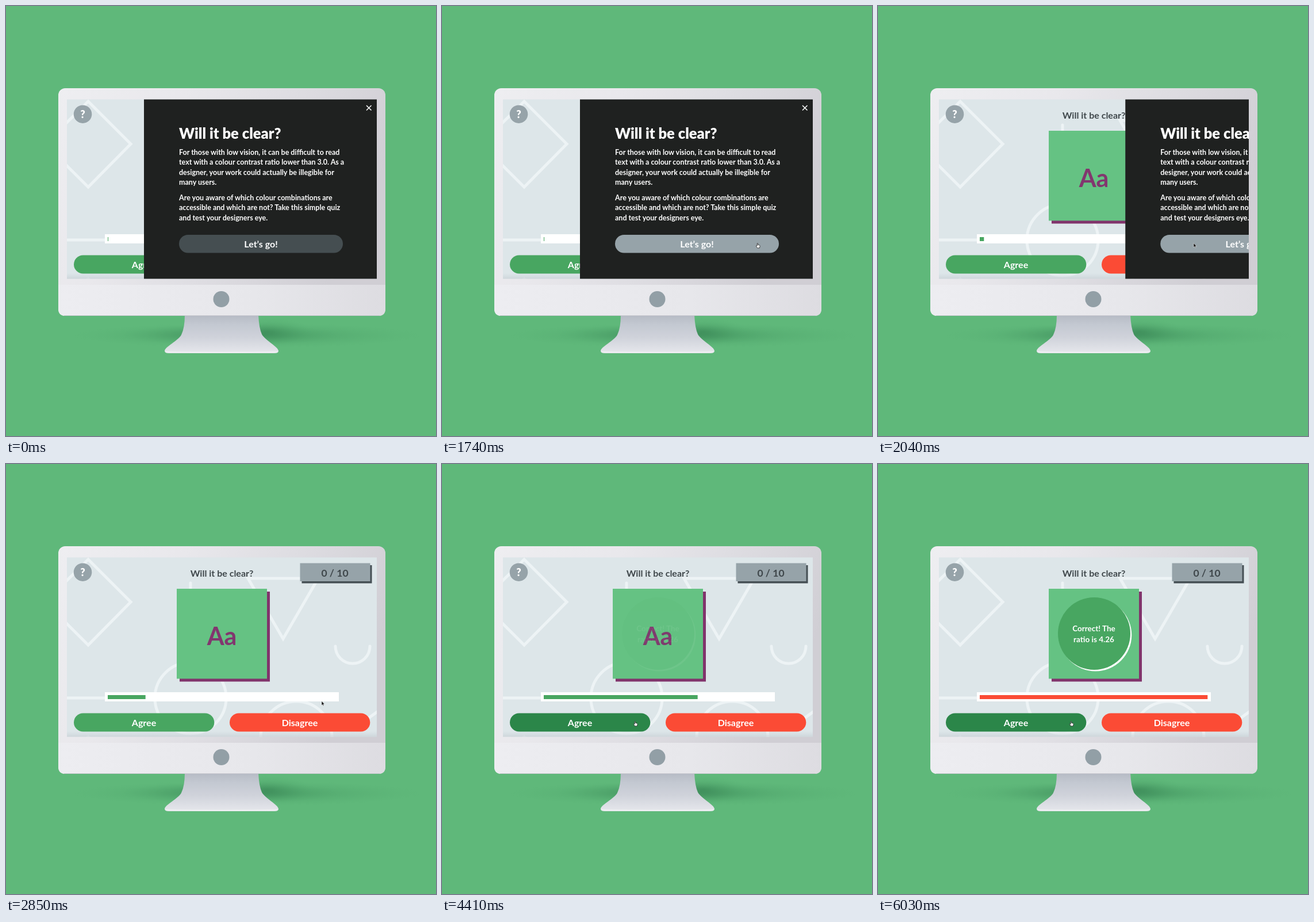
Animation, 748 px wide and 748 px high, one loop 6060 ms. Source, as an HTML page:

```html
<!DOCTYPE html>
<html lang="en">
<head>
<meta charset="utf-8">
<title>Contrast quiz</title>
<style>
  html, body { margin: 0; width: 100%; height: 100%; overflow: hidden; background: #5fb87a; }
  svg { display: block; width: 100%; height: 100%; }
  text { font-family: Lato, "Open Sans", sans-serif; font-weight: 700; }
  .mid { text-anchor: middle; }
  .label { font-size: 16px; fill: #fff; text-anchor: middle; }
  .body { font-size: 12.5px; fill: #fff; }
  .pattern { fill: none; stroke: #edf3f5; stroke-width: 5; stroke-linecap: round; }
</style>
</head>
<body>
<svg viewBox="0 0 748 748" xmlns="http://www.w3.org/2000/svg">
  <defs>
    <linearGradient id="shell" x1="0" x2="1" y1="0" y2="0.35">
      <stop offset="0" stop-color="#eeeef1"/>
      <stop offset="0.35" stop-color="#e9e8ec"/>
      <stop offset="0.65" stop-color="#dedde2"/>
      <stop offset="1" stop-color="#d0ced4"/>
    </linearGradient>
    <linearGradient id="chin" x1="0" x2="1" y1="0" y2="0">
      <stop offset="0" stop-color="#ededf1"/>
      <stop offset="0.6" stop-color="#e7e7eb"/>
      <stop offset="1" stop-color="#dddce1"/>
    </linearGradient>
    <linearGradient id="stand" x1="0" x2="0" y1="0" y2="1">
      <stop offset="0" stop-color="#b5bac4"/>
      <stop offset="0.25" stop-color="#c3c8d1"/>
      <stop offset="0.6" stop-color="#d0d3db"/>
      <stop offset="1" stop-color="#e6e7ec"/>
    </linearGradient>
    <linearGradient id="edge" x1="0" x2="0" y1="0" y2="1">
      <stop offset="0" stop-color="#ccd4d9" stop-opacity="0"/>
      <stop offset="1" stop-color="#c9d1d6" stop-opacity="0.8"/>
    </linearGradient>
    <radialGradient id="shade">
      <stop offset="0" stop-color="#2f7a4c" stop-opacity="0.75"/>
      <stop offset="0.5" stop-color="#3d8d5a" stop-opacity="0.4"/>
      <stop offset="1" stop-color="#4da56a" stop-opacity="0"/>
    </radialGradient>
    <clipPath id="screen"><rect x="106" y="162.500" width="539" height="312"/></clipPath>
  </defs>

  <rect width="748" height="748" fill="#5fb87a"/>
  <ellipse cx="420" cy="573" rx="306" ry="22" fill="url(#shade)" opacity="0.55"/>
  <ellipse cx="390" cy="572" rx="190" ry="19" fill="url(#shade)" opacity="0.7"/>
  <ellipse cx="455" cy="566" rx="75" ry="24" fill="url(#shade)" opacity="0.5"/>

  <path fill="url(#stand)" d="M311 537H439Q440 560 445 571C450 581 474 593 474 600Q474 604 467 604H283Q276 604 276 600C276 593 300 582 305 572Q311 560 311 537Z"/>
  <path fill="none" stroke="#f1f1f4" stroke-width="1.500" d="M278 601.500Q375 603.500 472 601.500"/>
  <rect x="91" y="143" width="569" height="396" rx="12" fill="url(#shell)"/>
  <path fill="url(#chin)" d="M91 485H660V527Q660 539 648 539H103Q91 539 91 527Z"/>
  <path fill="none" stroke="#c9c9d0" d="M101 538.500H650"/>
  <circle cx="374.500" cy="510" r="14" fill="#929fa6"/>

  <g clip-path="url(#screen)">
    <rect x="106" y="162" width="539" height="313" fill="#dde6e9"/>
    <g class="pattern">
      <path d="M143 166L217 240L143 315L68 240Z"/>
      <path d="M100 407H259M321 207V240"/>
      <circle cx="321" cy="407" r="62"/>
      <path d="M421 199H543L482 304Z"/>
      <path d="M573 317A30 30 0 0 0 633 317"/>
      <circle cx="505" cy="475" r="62"/>
      <path d="M650 428L625 446M130 487L143 475L156 487"/>
    </g>
    <rect x="106" y="465" width="539" height="10" fill="url(#edge)"/>

    <circle cx="133.500" cy="188.200" r="15.800" fill="#96a3a9"/>
    <text class="mid" x="133.500" y="195" font-size="18" style="font-weight:900" fill="#fff">?</text>
    <text class="mid" x="375.500" y="195.500" font-size="16" fill="#3f474b">Will it be clear?</text>
    <rect x="514.500" y="176" width="122" height="31.500" fill="#454f54"/>
    <rect x="511.500" y="172.500" width="122" height="31.500" fill="#96a3a9"/>
    <text class="mid" x="572" y="196" font-size="17.500" fill="#3f474b">0 / 10</text>

    <rect x="302" y="222" width="157" height="156.500" fill="#81346c"/>
    <rect x="297" y="217" width="157" height="156.500" fill="#65c283"/>
    <text class="mid" x="375.500" y="314.500" font-size="43" fill="#82366f">Aa</text>
    <g id="result">
      <circle cx="378.300" cy="297.500" r="63" fill="#fff"/>
      <circle cx="376" cy="295" r="63" fill="#48a661"/>
      <text class="mid" font-size="13.500" fill="#fff"><tspan x="375.500" y="291">Correct! The</tspan><tspan x="375.500" y="310">ratio is 4.26</tspan></text>
    </g>

    <rect x="172" y="397" width="407" height="16" fill="#fff"/>
    <rect id="bar" x="177" y="402" height="7"/>

    <rect id="agree" x="118" y="433.500" width="244.300" height="32" rx="16"/>
    <text class="label" x="240" y="456">Agree</text>
    <rect x="389" y="433.500" width="244.300" height="32" rx="16" fill="#fb4b35"/>
    <text class="label" x="511" y="456">Disagree</text>

    <g id="panel">
      <rect x="240" y="162" width="406" height="313" fill="#1f2120"/>
      <path d="M627 173L635.500 181.500M635.500 173L627 181.500" stroke="#fff" stroke-width="1.500"/>
      <text x="301" y="231" font-size="25.500" style="font-weight:900" fill="#fff">Will it be clear?</text>
      <g id="copy"></g>
      <rect id="start" x="301" y="398" width="285" height="31.500" rx="15.700"/>
      <text class="label" x="443.500" y="420">Let’s go!</text>
    </g>

    <g id="cursor">
      <path id="arrow" fill="#111" stroke="#fff" stroke-width="0.500" d="M0 0V7.300L1.700 5.800L2.800 8.300L4 7.800L2.900 5.300H5.200Z"/>
      <path id="hand" fill="#fff" stroke="#222" stroke-width="0.800" stroke-linejoin="round" d="M-0.800 0.500Q0 -0.600 0.700 0.500V3L3.500 3.700Q4.300 4 4.100 5.200L3.400 8.400H-0.500L-2.700 5.200Q-2.600 4 -0.800 4.800Z"/>
    </g>
  </g>
</svg>
<script>
const LOOP = 6060, STEP = 30;
const el = id => document.getElementById(id);
const clamp = v => Math.min(1, Math.max(0, v));
const swing = v => 0.5 - Math.cos(Math.PI * v) / 2;
const span = (t, start, length) => swing(clamp((t - start) / length));
const mix = (a, b, p) => a + (b - a) * p;
const blend = (a, b, p) => `rgb(${a.map((v, i) => Math.round(mix(v, b[i], p)))})`;
const bezier = (a, b, c, p) => mix(mix(a, b, p), mix(b, c, p), p);

const GREEN = [72, 166, 97], DEEP = [43, 134, 73], RED = [251, 75, 53];
const SLATE = [69, 78, 81], MIST = [150, 163, 169];

const copy = [
  ["For those with low vision, it can be difficult to read",
   "text with a colour contrast ratio lower than 3.0. As a",
   "designer, your work could actually be illegible for",
   "many users."],
  ["Are you aware of which colour combinations are",
   "accessible and which are not? Take this simple quiz",
   "and test your designers eye."]
];
copy.forEach((lines, block) => lines.forEach((line, i) => {
  const text = document.createElementNS("http://www.w3.org/2000/svg", "text");
  text.setAttribute("class", "body");
  text.setAttribute("x", 301);
  text.setAttribute("y", 259 + block * 79 + i * 17.25);
  text.textContent = line;
  el("copy").append(text);
}));

function cursorAt(t) {
  if (t < 840) {
    const p = span(t, 150, 660);
    return [bezier(648, 610, 554, p), bezier(330, 400, 411, p)];
  }
  if (t < 2990) {
    const p = span(t, 810, 210);
    return [mix(554, 549, p), mix(411, 412.5, p)];
  }
  const p = span(t, 2990, 590);
  return [bezier(549, 400, 336, p), bezier(412.5, 410, 447.5, p)];
}

function render(t) {
  const [x, y] = cursorAt(t);
  const onStart = t >= 600 && t < 1830;
  const onAgree = t >= 3360;
  const pointing = onStart || onAgree;
  el("cursor").setAttribute("transform", `translate(${x} ${y})`);
  el("cursor").setAttribute("visibility", t < 210 ? "hidden" : "visible");
  el("arrow").setAttribute("opacity", pointing ? 0 : 1);
  el("hand").setAttribute("opacity", pointing ? 1 : 0);

  el("start").setAttribute("fill", blend(SLATE, MIST, span(t, 600, 200)));
  el("agree").setAttribute("fill", blend(GREEN, DEEP, span(t, 3360, 200)));
  el("panel").setAttribute("transform", `translate(${406 * span(t, 1800, 500)} 0)`);

  el("bar").setAttribute("width", Math.max(1, 397 * span(t, 1650, 4500)));
  el("bar").setAttribute("fill", blend(GREEN, RED, span(t, 4500, 650)));
  el("result").setAttribute("opacity", span(t, 4350, 400));
}

const began = performance.now();
function tick() {
  const t = (performance.now() - began) % LOOP;
  render(Math.floor(t / STEP) * STEP);
  requestAnimationFrame(tick);
}
render(0);
requestAnimationFrame(tick);
</script>
</body>
</html>
```
